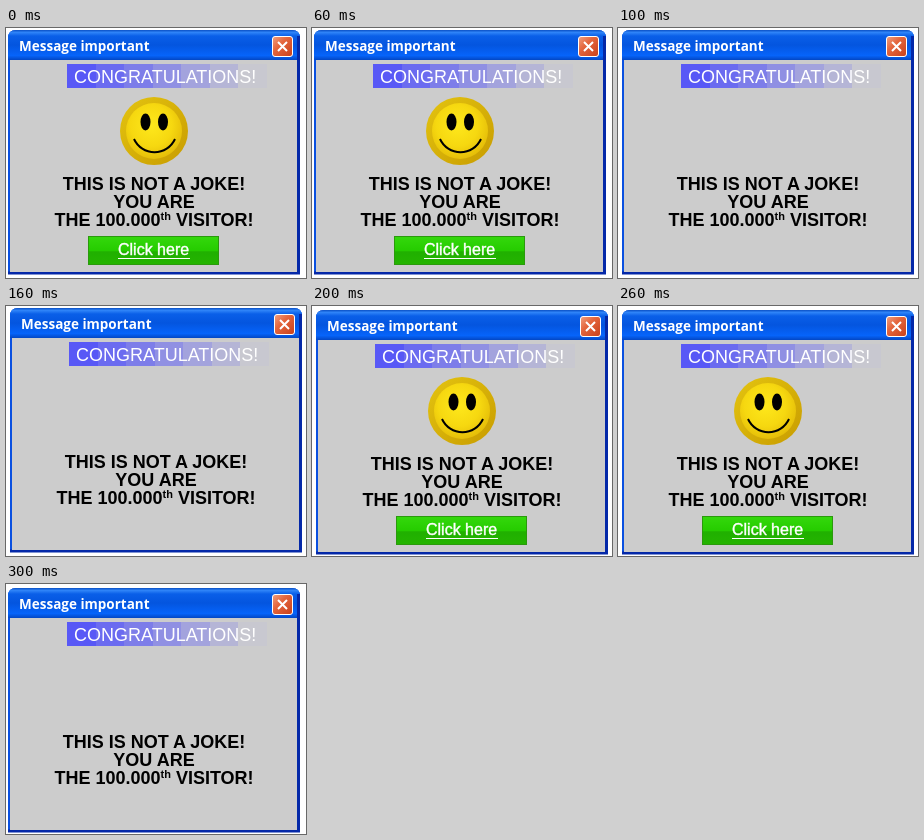
Recreate the animation shown at these times as an HTML page. Size 300x250 px, loop 0.4 s.

```html
<!DOCTYPE html>
<html lang="en">
<head>
<meta charset="utf-8">
<style>
html, body { margin: 0; width: 100%; height: 100%; overflow: hidden; background: #fff; }
svg { display: block; width: 300px; height: 250px; }
text { font-family: "Liberation Sans", Arial, sans-serif; white-space: pre; }
.bold { font-weight: 700; font-size: 18px; text-anchor: middle; }
.title { font: 700 13.5px "Open Sans", sans-serif; fill: #fff; }
</style>
</head>
<body>
<svg viewBox="0 0 300 250">
  <defs>
    <linearGradient id="bar" x2="0" y2="1">
      <stop offset="0" stop-color="#0a4fc4"/>
      <stop offset=".08" stop-color="#2f84f8"/>
      <stop offset=".2" stop-color="#0a5fe8"/>
      <stop offset=".5" stop-color="#0455df"/>
      <stop offset=".85" stop-color="#0664fa"/>
      <stop offset="1" stop-color="#0347c4"/>
    </linearGradient>
    <linearGradient id="close" x2="1" y2="1">
      <stop offset="0" stop-color="#f0a080"/>
      <stop offset=".4" stop-color="#e4653c"/>
      <stop offset="1" stop-color="#c8401a"/>
    </linearGradient>
    <linearGradient id="rim" x2="1" y2="1">
      <stop offset="0" stop-color="#e4c410"/>
      <stop offset="1" stop-color="#c89c00"/>
    </linearGradient>
    <radialGradient id="face" cx=".45" cy=".4" r=".62">
      <stop offset="0" stop-color="#fee81c"/>
      <stop offset=".6" stop-color="#f6d810"/>
      <stop offset="1" stop-color="#e4bc08"/>
    </radialGradient>
    <linearGradient id="green" x2="0" y2="1">
      <stop offset="0" stop-color="#34d80c"/>
      <stop offset=".5" stop-color="#26cc00"/>
      <stop offset=".55" stop-color="#20b000"/>
      <stop offset="1" stop-color="#24b400"/>
    </linearGradient>
  </defs>
  <g id="win">
    <path d="M2 246V10Q2 2 10 2H286Q294 2 294 10V246Z" fill="#0a50e0"/>
    <path d="M2 32V10Q2 2 10 2H286Q294 2 294 10V32Z" fill="url(#bar)"/>
    <path d="M2 245H292.500V8" fill="none" stroke="#0428a8" stroke-width="3"/>
    <rect x="4" y="32" width="287" height="212" fill="#ccc"/>
    <text class="title" x="13" y="23">Message important</text>
    <rect x="266.500" y="8.500" width="20" height="20" rx="2.500" fill="url(#close)" stroke="#fff"/>
    <path d="M272 14l9 9m0-9l-9 9" stroke="#fff" stroke-width="2"/>
    <g id="banner"></g>
    <text x="68" y="55" font-size="18" fill="#fff">CONGRATULATIONS!</text>
    <text class="bold" x="148" y="162">THIS IS NOT A JOKE!</text>
    <text class="bold" x="148" y="180">YOU ARE</text>
    <text class="bold" x="148" y="198">THE 100.000<tspan font-size="11" dy="-6">th</tspan><tspan dy="6"> VISITOR!</tspan></text>
    <g id="blink">
      <circle cx="148" cy="103" r="34" fill="url(#rim)"/>
      <circle cx="148" cy="103" r="28" fill="url(#face)"/>
      <ellipse cx="139.500" cy="94" rx="5" ry="8.500"/>
      <ellipse cx="157" cy="94" rx="5" ry="8.500"/>
      <path d="M128 111A22.500 22.500 0 0 0 169 111" fill="none" stroke="#000" stroke-width="2"/>
      <rect x="82.500" y="208.500" width="130" height="28" fill="url(#green)" stroke="#2a9a0c"/>
      <text x="112" y="227" font-size="16" fill="#fff" stroke="#fff" stroke-width=".4">Click here</text>
      <rect x="112" y="230" width="72" height="1" fill="#fff"/>
    </g>
  </g>
</svg>
<script>
const STEP = 100;
const SHAKE = [[0, 0], [2, 0], [2, 2], [0, 2]];
const [win, blink, banner] = ["win", "blink", "banner"].map(id => document.getElementById(id));

// Banner fades from blue to the window grey in flat bands.
const BANDS = 7, LEFT = 61, WIDTH = 200;
const mix = (a, b, k) => Math.round(a + (b - a) * k);
for (let i = 0; i < BANDS; i++) {
  const band = document.createElementNS("http://www.w3.org/2000/svg", "rect");
  const k = i / (BANDS - 1);
  const edge = n => Math.round(LEFT + WIDTH * n / BANDS);
  const attrs = {
    x: edge(i), y: 36, width: edge(i + 1) - edge(i), height: 24,
    fill: `rgb(${mix(88, 200, k)},${mix(88, 200, k)},${mix(246, 208, k)})`
  };
  for (const name in attrs) band.setAttribute(name, attrs[name]);
  banner.append(band);
}

function draw(time) {
  const step = Math.floor(time / STEP) % SHAKE.length;
  win.setAttribute("transform", `translate(${SHAKE[step]})`);
  blink.setAttribute("visibility", step % 2 ? "hidden" : "visible");
}

const start = performance.now();
function tick() {
  draw(performance.now() - start);
  requestAnimationFrame(tick);
}
tick();
</script>
</body>
</html>
```
